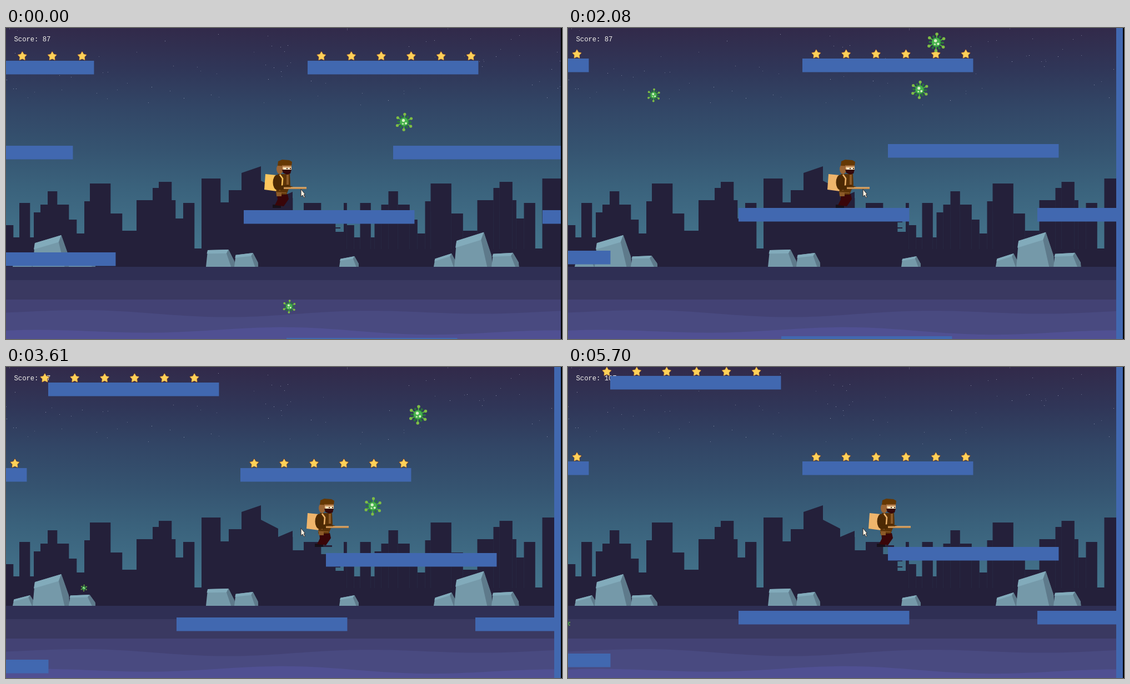
Animation of 1001 by 560 pixels, one loop 5.79 s. Source, as an HTML page with a canvas:

```html
<!DOCTYPE html>
<html lang="en">
<head>
<meta charset="utf-8">
<title>Night platformer</title>
<style>
html, body { margin: 0; width: 100%; height: 100%; overflow: hidden; background: #000; }
canvas { display: block; }
</style>
</head>
<body>
<canvas id="stage" width="1001" height="560"></canvas>
<script>
const W = 999, H = 560, GROUND = 430, LOOP = 5790, STEP = 76.6;
const TILE = 38.43, STAR_GAP = 53.85;
const BLUE = '#4168b0', SKYLINE = '#24203a';
const { cos, sin, PI, round, max } = Math;
const stage = document.getElementById('stage').getContext('2d');
let ctx = stage;

function trace(pts) {
  ctx.beginPath();
  for (let i = 0; i < pts.length; i += 2) ctx.lineTo(pts[i], pts[i + 1]);
}
function poly(color, ...pts) {
  trace(pts);
  ctx.fillStyle = color;
  ctx.fill();
}
function line(color, width, ...pts) {
  trace(pts);
  ctx.strokeStyle = color;
  ctx.lineWidth = width;
  ctx.stroke();
}
function rect(color, x, y, w, h) {
  ctx.fillStyle = color;
  ctx.fillRect(x, y, w, h);
}
function oval(color, x, y, rx, ry = rx) {
  ctx.fillStyle = color;
  ctx.beginPath();
  ctx.ellipse(x, y, rx, ry, 0, 0, PI * 2);
  ctx.fill();
}

// Scenery, painted once
function paintSky() {
  const sky = ctx.createLinearGradient(0, 0, 0, GROUND);
  const colors = ['#322a4a', '#303658', '#324666', '#355370', '#3a627c', '#416e87', '#477990'];
  colors.forEach((color, i) => sky.addColorStop(i / (colors.length - 1), color));
  rect(sky, 0, 0, W, GROUND);

  let seed = 11;
  const random = () => (seed = seed * 16807 % 2147483647) / 2147483647;
  for (let i = 0; i < 90; i++)
    rect(`rgba(200,205,225,${0.25 + random() * 0.4})`, random() * W | 0, random() * 140 | 0, 1, 1);
}

// Roofline of one city block: right edge and height of each step
const roofs = [[13, 355], [24, 377], [43, 315], [50, 377], [62, 332], [75, 318], [92, 294],
  [113, 318], [127, 345], [141, 370], [151, 312], [188, 280], [209, 334], [235, 365],
  [264, 310], [275, 288], [298, 277], [305, 310], [319, 343], [339, 315], [352, 397],
  [386, 271], [401, 314], [424, 292], [516, 306], [536, 330], [567, 315], [593, 337],
  [608, 367], [613.5, 315]];

function paintCity(shift) {
  ctx.save();
  ctx.translate(shift, 0);
  let left = 0;
  for (const [right, top] of roofs) {
    rect(SKYLINE, left, top, right - left + 0.3, GROUND - top);
    left = right;
  }
  poly(SKYLINE, 424, 310, 424, 261, 459, 249, 459, 275, 490, 291, 490, 306, 516, 295, 516, 310);
  for (const y of [348, 359]) rect(SKYLINE, 593, y, 9, 2);
  ctx.restore();
}

// A leaning block: lit front, lighter top facet, shaded right side
function rock(x, w, h, shoulder) {
  ctx.save();
  ctx.translate(x, GROUND);
  ctx.scale(w, -h);
  poly('#7599a9', 0, 0, 0.06, shoulder, 0.78, 1, 0.99, 0.3, 1, 0);
  poly('#82abbb', 0.06, shoulder, 0.78, 1, 0.71, 0.78, 0.03, shoulder - 0.2);
  poly('#5e7a8b', 0.78, 1, 0.98, 0.35, 1, 0, 0.87, 0, 0.71, 0.78);
  ctx.restore();
}

function wave(color, y, amp, phase) {
  const pts = [0, H];
  for (let x = 0; x <= 1000; x += 10)
    pts.push(x, y + amp * (sin(x / 75 + phase) + 0.7 * sin(x / 160 + phase * 2)));
  poly(color, ...pts, 1000, H);
}

function paintScenery() {
  paintSky();
  paintCity(0);
  paintCity(613.5);
  rect(SKYLINE, 0, 398, W, 32);

  for (const [x, scale] of [[12, 1], [770, 1.03]]) {
    rock(x, 40 * scale, 19 * scale ** 8, 0.6);
    rock(x + 36 * scale, 66 * scale, 57 * scale ** 3, 0.75);
    rock(x + 101 * scale, 48 * scale, 20 * scale ** 8, 0.92);
  }
  rock(360, 52, 31, 0.97);
  rock(411, 43, 25, 0.85);
  rock(600, 35, 19, 0.75);

  rect('#2f2f54', 0, GROUND, W, 24);
  rect('#3a3961', 0, 454, W, 35);
  rect('#434274', 0, 489, W, 71);
  wave('#494a80', 513, 4.5, 2.6);
  wave('#505092', 546, 4.5, 4.2);
  rect('#000', W, 0, 2, H);
}

const scenery = document.createElement('canvas');
scenery.width = 1001;
scenery.height = H;
ctx = scenery.getContext('2d');
paintScenery();
ctx = stage;

// Tile column, tile row, whether stars stand on it
const platforms = [[-7, 0, true], [11, 0, true], [2, -4, true], [15, 4], [-8, 4],
  [8, 7], [22, 7], [-6, 9], [10, 13]];

// Each drifts in a straight line and bobs: y + vy*t + amp*cos(rate*(t - peak))
const viruses = [
  { r: 16, x: 596, vx: 17.9, y: 159, vy: -14.4, amp: 18, rate: 2, peak: 3.735, until: 4.7 },
  { r: 12, x: 389, vx: -112.7, y: 452.6, vy: -89.3, amp: 148, rate: 2.2, peak: 3.428 },
  { r: 17, x: 556, vx: 51.5, y: 59.4, vy: -29.2, amp: 28.2, rate: 4.83, peak: 2.03, from: 1.4, until: 5 },
  { r: 6, x: 480, vx: -94, y: 200, vy: 0, amp: 292, rate: 2.48, peak: 3.08, from: 0.08 },
  { r: 6, x: -30, vx: 5, y: 347, vy: 0, amp: 0, rate: 0, peak: 0, from: 5.67 }
];

// Hero's run: seconds, world position
const run = [[0, 344], [0.62, 411], [0.85, 432], [1.4, 432], [1.85, 467], [2.57, 467], [3.6, 541]];
const CAMERA_EDGE = 465;

function linear(keys, t) {
  const i = keys.findIndex(key => key[0] > t);
  if (i < 0) return keys[keys.length - 1][1];
  const [t0, a] = keys[i - 1], [t1, b] = keys[i];
  return a + (b - a) * (t - t0) / (t1 - t0);
}

// Height above the first platform: a last bit of fall, then one leap
function height(t) {
  if (t < 0.08) return 3.5;
  const s = max(0, t - 2.89);
  return s > 0.76 ? 115 : 643 * s - 647 * s * s;
}

function drawStar(x, y) {
  const pts = [];
  for (let i = 0; i < 12; i++) {
    const r = i % 2 ? 4.3 : 8, a = i * PI / 5 - PI / 2;
    pts.push(x + r * cos(a), y + 0.4 + r * sin(a));
  }
  ctx.lineJoin = 'round';
  line('#6a3a30', 2.2, ...pts);
  poly('#ffd158', ...pts);
  line('#ffd158', 0.7, ...pts);
}

function drawVirus(x, y, r) {
  ctx.save();
  ctx.translate(x, y);
  ctx.scale(r / 16, r / 16);
  for (let i = 0; i < 12; i++) {
    const front = i % 2, a = (i - 1) * PI / 6 - PI / 2 + 0.06;
    const reach = front ? 14 : 11, c = cos(a), s = sin(a);
    line(front ? '#4fae43' : '#2a743b', 2, 0, 0, c * reach, s * reach);
    oval(front ? '#7fbd45' : '#2a743b', c * reach, s * reach, front ? 2.6 : 2);
  }
  oval('#2f8d3d', 0, 0, 8.2);
  oval('#47b34d', -0.5, -0.5, 7.2);
  oval('#d9efc8', -1.5, -2.8, 2.6);
  oval('#d9efc8', 3, 2.6, 2);
  oval('#c7e6b2', -2.6, 3.2, 1.5);
  ctx.restore();
}

function drawHero(x, t) {
  const coat = '#5c3308', sleeve = '#4c2904', fur = '#9b6535';
  const pack = t < 0.7 ? '#fcc65d' : '#efb56c';
  ctx.save();
  ctx.translate(x, 0);
  poly(pack, 2, 263, 32, 266, 30, 295, 0, 291);
  // legs
  rect('#17111a', 15, 318, 15, 6);
  rect('#272036', 30, 321, 16, 3);
  poly('#390609', 23, 299, 42, 299, 44, 308, 35, 321, 19, 319, 24, 309);
  // coat
  poly(coat, 24, 263, 46, 263, 47, 282, 40, 300, 21, 300);
  line('#8c5a28', 4, 42, 264, 42, 282);
  line('#8c5a28', 1.5, 21, 296, 40, 297);
  line(pack, 2.5, 28, 264, 33, 271, 32, 284, 27, 292);
  oval(sleeve, 23, 278, 7.5, 13.5);
  poly(sleeve, 20, 284, 43, 283, 52, 286, 47, 290, 26, 292);
  rect('#8c5a28', 22, 297, 9, 6);
  // head
  oval(fur, 28, 254, 6, 9);
  rect('#e8be8c', 33, 249, 16, 7);
  rect('#fff3cf', 35, 252, 13, 3);
  for (const eye of [40, 46]) rect('#4b2819', eye, 252, 2, 2);
  poly('#34080b', 32, 255, 49, 255, 47, 262, 41, 264, 34, 261);
  poly('#653804', 24, 248, 25, 240, 32, 237, 45, 238, 50, 241, 49, 249);
  rect(fur, 32, 247, 17, 2.5);
  // weapon
  rect('#c58d4d', 35, 286.5, 41, 3.5);
  rect('#e6b478', 48, 286.5, 28, 1.2);
  ctx.restore();
}

function drawPointer() {
  const shape = [531, 290, 531, 303.5, 534, 301, 536.5, 305.5, 538.3, 304.5, 536.3, 300, 538.5, 299.5];
  poly('#f7eee0', ...shape);
  line('#2a2020', 0.9, ...shape, 531, 290);
}

function draw(ms) {
  const t = ms < 90 ? 0 : (90 + Math.floor((ms - 90) / STEP + 0.06) * STEP) / 1000;
  const world = linear(run, t);
  const dx = max(0, CAMERA_EDGE - world), dy = height(t);
  ctx.drawImage(scenery, 0, 0);
  ctx.save();
  ctx.beginPath();
  ctx.rect(0, 0, W, H);
  ctx.clip();

  const kills = viruses.filter(v => t >= v.until).length;
  ctx.fillStyle = '#f4f2ee';
  ctx.font = '12.2px "Courier New", "Liberation Mono", monospace';
  ctx.fillText('Score: ' + (87 + 10 * kills), 14.5, 24);

  for (const [col, row, starred] of platforms) {
    const x = col * TILE - 0.5, y = 55 + row * TILE;
    rect(BLUE, round(x + dx), round(y + dy), TILE * 8, 24.5);
    const first = round((x - 16) / STAR_GAP);
    for (let i = 0; starred && i < 6; i++)
      drawStar(16 + (first + i) * STAR_GAP + dx, y - 8 + dy);
  }
  rect(BLUE, 987 + dx, 0, 12, H);

  for (const v of viruses) {
    if (t < (v.from || 0) || t >= v.until) continue;
    const y = v.y + v.vy * t + v.amp * cos(v.rate * (t - v.peak));
    drawVirus(v.x + v.vx * t + dx, y + dy, v.r);
  }

  drawHero(max(CAMERA_EDGE, world), t);
  drawPointer();
  ctx.restore();
}

const start = performance.now();
function tick() {
  draw((performance.now() - start) % LOOP);
  requestAnimationFrame(tick);
}
tick();
</script>
</body>
</html>
```
